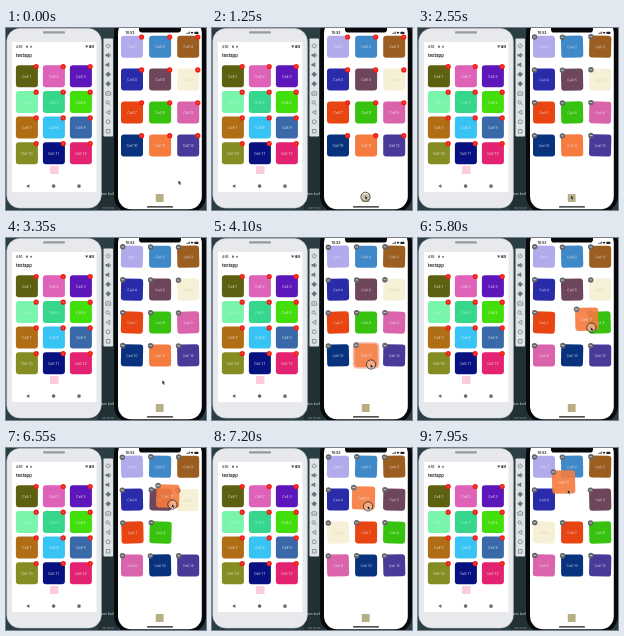
An HTML page that plays this animation: 200 px wide and 182 px high, repeating every 8 s.

```html
<!DOCTYPE html>
<html lang="en">
<head>
<meta charset="utf-8">
<title>Cell grid reorder</title>
<style>
html, body { margin: 0; width: 100%; height: 100%; overflow: hidden; background: #2a3e44; }
svg { display: block; width: 100vw; height: 100vh; font-family: Roboto, Arial, sans-serif; }
.ios { font-family: Inter, Arial, sans-serif; }
</style>
</head>
<body>
<svg id="stage" viewBox="0 0 200 182"></svg>
<script>
const LOOP = 8000;
const SIZE = 22;
const NS = 'http://www.w3.org/2000/svg';
const stage = document.getElementById('stage');

function add(parent, tag, attrs, text) {
  const node = document.createElementNS(NS, tag);
  for (const key in attrs) node.setAttribute(key, attrs[key]);
  if (text) node.textContent = text;
  parent.appendChild(node);
  return node;
}
const rect = (p, x, y, width, height, rx, fill, more) =>
  add(p, 'rect', { x, y, width, height, rx, fill, ...more });
const dot = (p, cx, cy, r, fill, more) => add(p, 'circle', { cx, cy, r, fill, ...more });
const path = (p, d, fill, more) => add(p, 'path', { d, fill, ...more });
const label = (p, x, y, size, fill, text, more) =>
  add(p, 'text', { x, y, 'font-size': size, fill, ...more }, text);

const clamp = v => Math.max(0, Math.min(1, v));
const mix = (a, b, k) => a + (b - a) * k;
const ease = k => k * k * (3 - 2 * k);
const ramp = (t, start, length) => clamp((t - start) / length);

// Position on a timed route of [time, x, y] stops
function along(stops, t) {
  let i = 0;
  while (i < stops.length - 2 && t > stops[i + 1][0]) i++;
  const [t0, x0, y0] = stops[i], [t1, x1, y1] = stops[i + 1];
  const k = ease(ramp(t, t0, t1 - t0));
  return [mix(x0, x1, k), mix(y0, y1, k)];
}

function drawCell(parent, n, color, ink, size) {
  const g = add(parent, 'g');
  const half = SIZE / 2;
  rect(g, -half, -half, SIZE, SIZE, 3, color);
  label(g, 0, 1.6, size, ink, 'Cell ' + n, { 'text-anchor': 'middle', 'fill-opacity': 0.85 });
  return g;
}

function redBadge(parent, x, y) {
  const g = add(parent, 'g');
  dot(g, x, y, 2.6, '#f01c14');
  path(g, `M${x - 0.8} ${y - 0.8}l1.6 1.6m0-1.6l-1.6 1.6`, 'none', { stroke: '#fba8a0', 'stroke-width': 0.4 });
  return g;
}

function greyBadge(parent, x, y) {
  const g = add(parent, 'g');
  dot(g, x, y, 2.7, '#626468');
  path(g, `M${x - 1.4} ${y}h2.8`, 'none', { stroke: '#f4f4f4', 'stroke-width': 0.7 });
  return g;
}

function drawDesk() {
  rect(stage, 0, 0, 200, 182, 0, '#2a3e44');
  rect(stage, 92, 108, 20, 74, 0, '#213034');
  label(stage, 95, 166.5, 3.6, '#c8d0d0', 'lars built');
  label(stage, 96, 180.5, 3, '#829092', 'ow to run');
}

function drawAndroid() {
  rect(stage, 0.8, 0.5, 94.5, 179.5, 13, '#e7e9ec', { stroke: '#cfd2d5', 'stroke-width': 0.6 });
  rect(stage, 37, 3.3, 22, 2.2, 1.1, '#96999d');
  rect(stage, 6, 14, 84.5, 150, 0, '#fff');
  label(stage, 10, 20.2, 3.3, '#333', '4:50', { 'font-weight': 500 });
  rect(stage, 20, 17.6, 2, 2.2, 0.5, '#777');
  dot(stage, 25, 18.8, 1, '#777');
  path(stage, 'M79 17.6h3.4l-1.7 2.3zM83.2 20v-2.5l2.2-.5v3z', '#555');
  rect(stage, 86.4, 17, 1.4, 3, 0.3, '#555');
  label(stage, 10, 28.8, 4.7, '#222', 'testapp', { 'font-weight': 500 });

  const colors = ['#5d6011', '#df62b9', '#5c16b9', '#79f5ac', '#36d78c', '#43df0d',
    '#b06d13', '#37c3f3', '#3a69aa', '#848c22', '#071180', '#e32271'];
  colors.forEach((color, i) => {
    const x = 20.9 + i % 3 * 27, y = 48.2 + Math.floor(i / 3) * 25.7;
    const ink = [3, 4].includes(i) ? '#b9f8d2' : '#f2f2f2';
    drawCell(stage, i + 1, color, ink, 3.8).setAttribute('transform', `translate(${x} ${y})`);
    redBadge(stage, x + 9.3, y - 9.7);
  });
  rect(stage, 44, 138, 8.5, 8, 0.6, '#fccbdc');
  path(stage, 'M23.4 156.2v3.8l-3.3-1.9z', '#66686a');
  dot(stage, 47.6, 158.1, 1.8, '#66686a');
  rect(stage, 71.4, 156.5, 3.2, 3.2, 0.4, '#66686a');
}

function drawToolbar() {
  rect(stage, 97.5, 10.5, 9.5, 98, 0.8, '#e0e3e5');
  const line = { stroke: '#65727a', 'stroke-width': 0.7 };
  const glyphs = [
    'M-1.4-1.4a2 2 0 1 0 2.8 0M0-2.5v2.4',
    'M-2.3-.8h1.4L.7-2v4L-.9.8h-1.4zM1.6-1.4q1.2 1.4 0 2.8',
    'M-2.3-.8h1.4L.7-2v4L-.9.8h-1.4z',
    'M0-2.4l2.4 2.4-2.4 2.4-2.4-2.4z',
    'M0-2.4l2.4 2.4-2.4 2.4-2.4-2.4z',
    'M-2.3-1.3h1.4l.5-.8h1l.5.8h1.3v3.2h-4.7zM-.7.3h1.4',
    'M1-.4a1.6 1.6 0 1 0-3.2 0a1.6 1.6 0 1 0 3.2 0M.6.8l1.8 1.6',
    'M1.6-2.1v4.2l-3.5-2.1z',
    'M2 0a2 2 0 1 0-4 0a2 2 0 1 0 4 0',
    'M-1.8-1.8h3.6v3.6h-3.6z'
  ];
  glyphs.forEach((d, i) => path(stage, d, i && i < 5 ? '#65727a' : 'none',
    { ...line, transform: `translate(102.2 ${17.8 + i * 9.5})` }));
}

function drawIphone() {
  rect(stage, 108, -12, 92, 197, 17, '#08090a');
  rect(stage, 112, -8, 83.8, 189.3, 13, '#fff');
  path(stage, 'M133 0h42v1.6q0 3-3 3h-36q-3 0-3-3z', '#08090a');
  label(stage, 119.5, 6.2, 3.4, '#111', '10:53', { class: 'ios', 'font-weight': 600 });
  path(stage, 'M180.5 6v-1.1h.7V6zm1.2 0V4.2h.7V6zm1.2 0V3.6h.7V6z', '#222');
  path(stage, 'M184.5 4.3q1.5-1.3 3 0l-1.5 1.7z', '#222');
  rect(stage, 188.4, 3.8, 4, 2.2, 0.6, '#222');
  rect(stage, 149.8, 166, 7.8, 8, 0.6, '#b7ae84');
  rect(stage, 141, 178.3, 26, 1.2, 0.6, '#18191a');
}

drawDesk();
drawAndroid();
drawToolbar();
drawIphone();

const HELD = 10;
const EDIT = 1350;
const LIFT = 3850;
const DROP = 7900;
const slot = n => [126 + n % 3 * 28.1, 18.7 + Math.floor(n / 3) * 32.9];

// The empty slot jumps as the held cell passes over others
const moves = [[5060, 7], [5780, 8], [6530, 4]];
const slotWithGap = (i, gap) => {
  const rank = i > HELD ? i - 1 : i;
  return rank >= gap ? rank + 1 : rank;
};
const drag = [[4630, 154.1, 117.4], [5120, 143.5, 72.5], [5450, 147, 77], [6000, 178, 83],
  [6280, 176, 75], [6560, 161.8, 48], [7000, 151, 51], [7400, 152, 49], [DROP, 145.6, 34]];
const pointer = [[450, 173, 153], [1000, 153.5, 168], [2950, 153.5, 168], [3650, 159, 126.5]];

const grid = add(stage, 'g', { class: 'ios' });
const colors = ['#b1abeb', '#4089c8', '#9c5d21', '#292ba9', '#6d465b', '#f5f0d6',
  '#e84512', '#36c20e', '#da64ab', '#08327e', '#f67b3e', '#493a99'];
const cells = colors.map((color, i) => {
  const g = drawCell(grid, i + 1, color, i === 5 ? '#d8d0b4' : '#eeeef4', 3.6);
  if (i === HELD) {
    const glow = rect(g, -12.6, -12.6, 25.2, 25.2, 4, '#ef6d4b', { opacity: 0 });
    g.insertBefore(glow, g.firstChild);
    g.glow = glow;
  }
  return { g, i, red: redBadge(g, 9.6, -9.7), grey: greyBadge(g, -9.5, -9.7) };
});
grid.appendChild(cells[HELD].g);

const touch = dot(stage, 0, 0, 4.6, '#fff', { 'fill-opacity': 0.3, stroke: '#25211f', 'stroke-width': 0.8 });
const arrow = path(stage, 'M0 0v4.4l1-.9.7 1.6.8-.4-.7-1.5h1.4z', '#111', { stroke: '#fff', 'stroke-width': 0.35 });

function placeOf(i, t) {
  let gap = HELD, [x, y] = slot(i);
  for (const [start, next] of moves) {
    if (t < start) break;
    gap = next;
    const [tx, ty] = slot(slotWithGap(i, gap));
    const k = ease(ramp(t, start, 280));
    x = mix(x, tx, k);
    y = mix(y, ty, k);
  }
  return [x, y];
}

function render(t) {
  const edit = ramp(t, EDIT, 150);
  const lift = ease(ramp(t, LIFT, 200));
  for (const { g, i, red, grey } of cells) {
    const held = i === HELD;
    const [x, y] = held ? along(drag, t) : placeOf(i, t);
    const tilt = edit * 1.4 * Math.sin(t / 300 * Math.PI * 2 + i * 2.1);
    const scale = held ? 1 + 0.05 * lift : 1;
    g.setAttribute('transform', `translate(${x} ${y}) rotate(${tilt}) scale(${scale})`);
    red.setAttribute('opacity', 1 - edit);
    grey.setAttribute('opacity', edit);
    if (held) {
      g.setAttribute('opacity', 1 - 0.1 * lift);
      g.glow.setAttribute('opacity', 0.55 * lift * (1 - ramp(t, 4600, 250)));
    }
  }
  let [px, py] = along(pointer, t);
  if (t > 4630) {
    const [x, y] = along(drag, t);
    px = x + 4.6;
    py = y + 8.4;
  }
  const pressed = t >= 1150 && t < 1450 || t >= 3750 && t < DROP;
  touch.setAttribute('transform', `translate(${px} ${py + (t < 2000 ? 0.8 : 0)})`);
  touch.setAttribute('opacity', pressed ? 1 : 0);
  arrow.setAttribute('transform', `translate(${px - 0.6} ${py - 0.8})`);
}

function frame(now) {
  render(now % LOOP);
  requestAnimationFrame(frame);
}
render(0);
requestAnimationFrame(frame);
</script>
</body>
</html>
```
